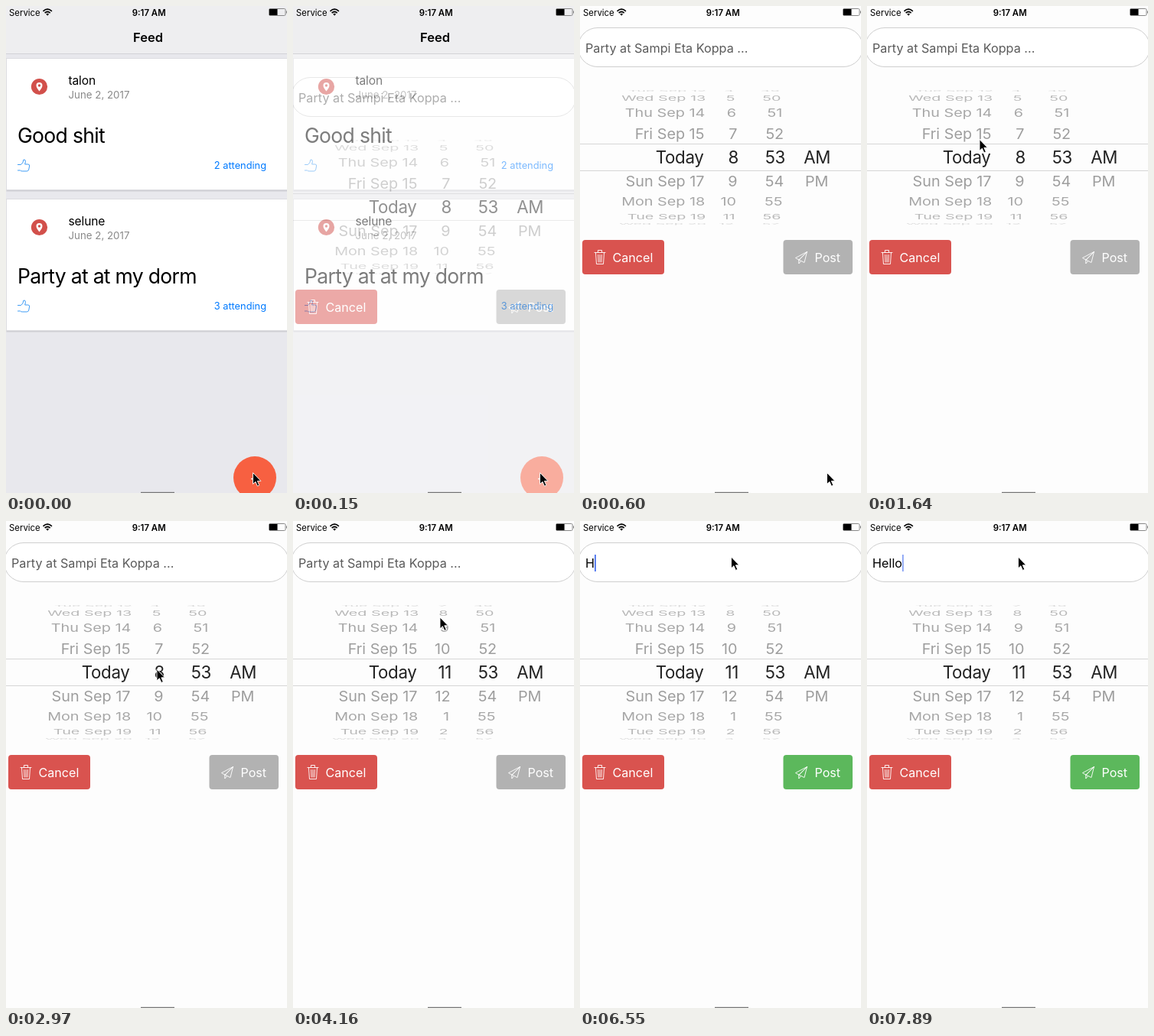
Recreate the animation shown at these times as an HTML page. Size 367 by 637 pixels, loop 8 s.

```html
<!DOCTYPE html>
<html lang="en">
<head>
<meta charset="utf-8">
<title>Feed</title>
<style>
html, body { margin: 0; width: 100%; height: 100%; overflow: hidden; background: #fdfdfd; }
svg { display: block; width: 367px; height: 637px; }
text { font-family: Inter, Roboto, sans-serif; white-space: pre; }
.small { font-size: 11.4px; }
.bold { font-weight: 600; text-anchor: middle; }
.name { font-size: 15.6px; letter-spacing: -.01em; }
.date { font-size: 13.3px; fill: #8a8a8a; }
.body { font-size: 26.6px; letter-spacing: -.027em; }
.link { font-size: 12.8px; fill: #007aff; text-anchor: end; }
.field { font-size: 16.2px; }
.btn { font-size: 16.1px; fill: #fff; }
.row { text-anchor: end; font-size: 19.8px; fill: #9a9a9a; }
.row.on { font-size: 22.3px; letter-spacing: -.015em; fill: #222; }
.line { fill: none; stroke-linejoin: round; stroke-linecap: round; }
</style>
</head>
<body>
<svg viewBox="0 0 367 637">
  <defs><clipPath id="drum"><rect y="109" width="367" height="178"/></clipPath></defs>

  <g id="form">
    <rect x="-2.5" y="28.5" width="372" height="51" rx="25.5" fill="#fff" stroke="#cfcfcf"/>
    <text id="field" class="field" x="7" y="60.5"></text>
    <rect id="caret" y="44" width="1.8" height="22" fill="#4a72f0"/>
    <path d="M0 180.5H367M0 215.5H367" stroke="#d6d6d6"/>
    <g clip-path="url(#drum)"><g id="fixed"></g><g id="hours"></g></g>
    <rect x="3" y="306" width="107" height="45" rx="4" fill="#d9534f"/>
    <path class="line" stroke="#fff" stroke-width=".9" d="M19 322.5h14M23.5 322v-2.5h5v2.5M20.5 323l1 14.5h9l1-14.5M23.7 325.500l.4 9.500M26 325.500v9.500M28.300 325.500l-.4 9.500"/>
    <text class="btn" x="42.500" y="334.500">Cancel</text>
    <rect id="post" x="265.500" y="306" width="90.500" height="45" rx="4"/>
    <path class="line" stroke="#fff" stroke-width=".9" d="M296.500 321.500L281.500 329.500l4.300 2.500zL285.800 332v5l2.700-3.300M296.500 321.500L293 335.500l-7.200-3.500"/>
    <text class="btn" x="306.500" y="334.500">Post</text>
  </g>

  <g id="feed">
    <rect y="62" width="367" height="575" fill="#e8e8ed"/>
    <g id="cards"></g>
    <circle cx="325" cy="617" r="28" fill="#f76041"/>
    <path d="M320 618.500h10M325 613.500v10" stroke="#fff" stroke-width="1.600"/>
  </g>

  <g id="header">
    <path d="M0 0H367V62H0z" fill="#eeeef0"/>
    <path d="M0 62.500H367" stroke="#d3d3d7"/>
    <text class="bold" x="185.500" y="46.500" font-size="16.500">Feed</text>
  </g>

  <text class="small" x="4" y="12.500">Service</text>
  <g class="line" stroke="#000" stroke-width="1.700" style="stroke-linecap:butt">
    <path d="M48.500 6.800q5.700-5.200 11.400 0M50.700 9.100q3.500-3.200 7 0"/>
    <path d="M54.200 12.800l-1.900-2.200q1.900-1.500 3.800 0z" fill="#000" stroke="none"/>
  </g>
  <text class="small bold" x="186.700" y="12.500">9:17 AM</text>
  <rect x="343.500" y="3.500" width="21.500" height="9" rx="1.500" fill="none" stroke="#888"/>
  <rect x="344" y="4" width="10.500" height="8" fill="#000"/>
  <path d="M366.500 6.500v3" stroke="#888"/>
  <path d="M176 636.500h44" stroke="#777" stroke-width="1.500"/>
  <path id="cursor" d="M0 0V14.800L3.400 11.700L5.900 17.400L8.300 16.300L5.800 10.800H10.400Z" fill="#000" stroke="#fff" stroke-width=".9"/>
</svg>

<script>
const $ = id => document.getElementById(id);

const card = (y, name, title, count) => `<g transform="translate(0 ${y})">
  <rect x=".5" y="1.500" width="370" height="173" fill="#cfcfd4"/>
  <rect x=".5" y=".5" width="370" height="172" fill="#fff" stroke="#dcdce0"/>
  <circle cx="43.500" cy="37.500" r="10.600" fill="#d2504b"/>
  <path d="M43.500 43.500Q39.500 38.500 39.500 36a4 4 0 0 1 8 0Q47.500 38.500 43.500 43.500z" fill="#fff"/>
  <circle cx="43.500" cy="36" r="1.700" fill="#d2504b"/>
  <text class="name" x="81.500" y="35">${name}</text>
  <text class="date" x="81.500" y="53">June 2, 2017</text>
  <text class="body" x="15" y="111">${title}</text>
  <path class="line" stroke="#3d9bf5" d="M15.500 139.500h4q3-2 3.500-6.500q2.500-.5 2.500 2.500l-.8 3.500h4q2 0 2 2l-1 5q-.5 2-2.500 2h-6q-2 0-2.500-1h-3.200"/>
  <text class="link" x="340" y="145">${count} attending</text>
</g>`;
$("cards").innerHTML = card(68, "talon", "Good shit", 2) + card(252, "selune", "Party at at my dorm", 3);

// Rows of a picker column, wrapped on a drum of radius 88
function column(right, drift, label, pos = 0) {
  let out = "";
  for (let n = Math.ceil(pos - 4.2); n <= pos + 4.2; n++) {
    const d = n - pos, a = d * .36, depth = Math.cos(a), on = Math.abs(d) < .5;
    const x = right + drift * Math.abs(d), y = 198 + 88 * Math.sin(a);
    out += `<text class="row${on ? " on" : ""}" y=".365em" opacity="${on ? 1 : Math.sqrt(depth)}"
      transform="translate(${x} ${y}) scale(1 ${depth})">${label(n)}</text>`;
  }
  return out;
}
const days = ["Sun", "Mon", "Tue", "Wed", "Thu", "Fri", "Sat"];
const day = n => n ? `${days[(n + 6) % 7]} Sep ${16 + n}` : "Today";
const hour = n => (n + 11) % 12 + 1;
$("fixed").innerHTML = column(161.5, .9, day) + column(268, -1.800, n => 53 + n)
  + column(327, -2.500, n => ["AM", "PM"][n] || "");

// Each list holds [time, values...]; a value stays until the next time
const pointer = [[0, 322.500, 610.500], [1040, 230, 430], [1190, 119, 234], [1490, 133, 207],
  [1640, 147, 174.500], [1790, 160, 110], [1940, 170, 42], [2080, 169, 60], [2230, 166, 110],
  [2380, 161, 170], [2520, 157, 207], [2670, 172, 203], [2820, 188, 198], [2970, 197, 194],
  [3420, 197, 182], [3570, 195, 157], [3720, 193, 135], [3870, 192, 126], [4310, 195, 80],
  [4460, 197.500, 47]];
const spin = [[0, 0], [3420, .4], [3570, 1.300], [3720, 2.300], [3870, 2.800], [4010, 3]];
const feedFade = [[0, 1], [150, .5], [300, 0]];
const barHeight = [[0, 65], [450, 25], [600, 0]];
const blink = [[0, 0], [4900, 1], [5200, .65], [5350, .3], [5500, 0], [5800, 1], [6250, .65],
  [6400, .3], [6550, 1], [7890, .65]];
const typed = [[0, 0], [6550, 1], [6700, 2], [7000, 3], [7150, 4], [7290, 5]];
const at = (list, t) => list.findLast(k => k[0] <= t).slice(1);

function draw(t) {
  const [x, y] = at(pointer, t), [bar] = at(barHeight, t), [fade] = at(feedFade, t);
  const [count] = at(typed, t), field = $("field");
  $("cursor").setAttribute("transform", `translate(${x} ${y})`);
  $("form").setAttribute("transform", `translate(0 ${bar})`);
  $("header").setAttribute("transform", `translate(0 ${bar - 65})`);
  $("header").setAttribute("visibility", bar ? "visible" : "hidden");
  $("feed").setAttribute("opacity", fade);
  $("hours").innerHTML = column(207, -1.500, hour, 8 + at(spin, t)[0]);
  field.textContent = count ? "Hello".slice(0, count) : "Party at Sampi Eta Koppa ...";
  field.setAttribute("fill", count ? "#000" : "#5a5a5a");
  $("caret").setAttribute("x", count ? 7 + field.getComputedTextLength() : 7);
  $("caret").setAttribute("opacity", at(blink, t)[0]);
  $("post").setAttribute("fill", count ? "#5cb85c" : "#b2b2b2");
}

const start = performance.now();
function tick() {
  draw((performance.now() - start) % 8000);
  requestAnimationFrame(tick);
}
tick();
</script>
</body>
</html>
```
